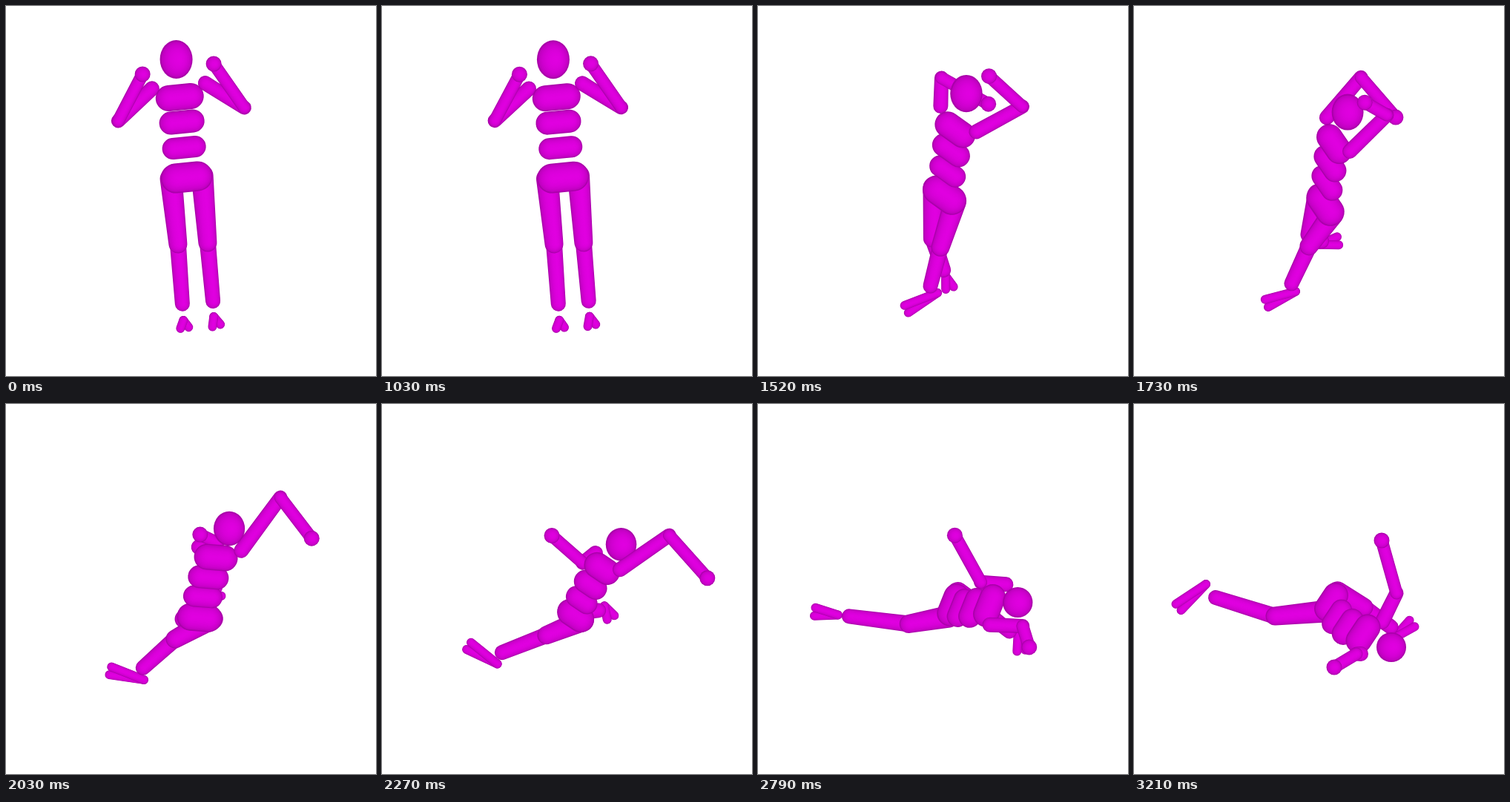
Recreate the animation shown at these times as an HTML page with a canvas. Size 499 by 499 pixels, loop 4030 ms.

```html
<!DOCTYPE html>
<html lang="en">
<head>
<meta charset="utf-8">
<title>Falling figure</title>
<style>
  html, body { margin: 0; width: 100%; height: 100%; overflow: hidden; background: #fff; }
  canvas { display: block; width: 100vw; height: 100vh; }
</style>
</head>
<body>
<canvas id="stage" width="499" height="499"></canvas>
<script>
const ctx = document.getElementById('stage').getContext('2d');
const LOOP = 4030;
const TIMES = [1010, 1300, 1730, 2030, 2520, 3200];
const LAYERS = 12;

const mix = (a, b, u) => a + (b - a) * u;
const between = (p, q, u) => p.map((v, k) => mix(v, q[k], u));
const add = (p, q, scale = 1) => p.map((v, k) => v + q[k] * scale);

// A smooth path through one point per key time, at rest at both ends.
function track(...points) {
  const last = points.length - 1;
  const slope = (i, k) => (points[i + 1][k] - points[i][k]) / (TIMES[i + 1] - TIMES[i]);
  const speed = (i, k) => i === 0 || i === last ? 0 : mix(slope(i - 1, k), slope(i, k),
    (TIMES[i] - TIMES[i - 1]) / (TIMES[i + 1] - TIMES[i - 1]));
  return time => {
    const t = Math.min(Math.max(time, TIMES[0]), TIMES[last]);
    const i = Math.min(TIMES.findLastIndex(key => key <= t), last - 1);
    const h = TIMES[i + 1] - TIMES[i], u = (t - TIMES[i]) / h;
    return [0, 1].map(k => mix(points[i][k], points[i + 1][k], u * u * (3 - 2 * u)) +
      h * u * (1 - u) * (speed(i, k) * (1 - u) - speed(i + 1, k) * u));
  };
}

// Only the joints that steer the pose; the rest of the body follows from them.
const head = track([230.5, 72], [268, 92.5], [288, 143], [301, 168], [344, 216], [347, 328]);
const chest = track([235, 123], [259, 146], [270, 186], [283, 207], [309, 239], [309, 310]);
const pelvis = track([244, 231], [245, 243], [258, 268], [261, 288], [261, 276], [266, 267]);
const across = track([30, -3], [30, 4], [13, 19], [24, 2], [-2, 22], [-12, 18]);

const left = {
  side: -1,
  elbow: track([152, 155], [175, 125], [306, 96], [285, 187], [267, 223], [354, 255]),
  hand: track([185, 92], [234, 114], [353, 150], [262, 176], [225, 173], [334, 184]),
  knee: track([232, 321], [234, 316], [237, 308], [240, 290], [282, 276], [310, 274]),
  heel: track([239, 424], [256, 402], [250, 322], [265, 265], [337, 298], [350, 316]),
  toe: track([240.5, 434], [243, 434], [275, 317], [288, 254], [332, 341], [375, 296])
};
const right = {
  side: 1,
  elbow: track([322, 137], [369, 122], [341, 147], [370, 126], [392, 249], [300, 337]),
  hand: track([281, 78], [325, 70], [311, 130], [412, 181], [429, 288], [270, 355]),
  knee: track([272, 319], [258, 324], [236, 324], [228, 317], [215, 306], [190, 286]),
  heel: track([280, 419], [264, 392], [218, 385], [186, 372], [127, 323], [97, 243]),
  toe: track([283.5, 431], [227, 412], [179, 401], [141, 360], [97, 297], [60, 274])
};

// Fills nested layers from the darker rim to the lit middle.
function shade(radius, tracePath) {
  for (let i = 0; i < LAYERS; i++) {
    const q = 1 - i / LAYERS;
    const light = Math.round(170 + 54 * Math.sqrt(1 - q * q));
    ctx.fillStyle = `rgb(${light},0,${light})`;
    ctx.beginPath();
    tracePath(q, radius * 0.2 * (1 - q));
    ctx.fill();
  }
}

function limb([x1, y1], [x2, y2], r1, r2 = r1) {
  const a = Math.atan2(y2 - y1, x2 - x1), quarter = Math.PI / 2;
  shade(r1, (q, shift) => {
    ctx.arc(x1 + shift, y1, r1 * q, a + quarter, a + 3 * quarter);
    ctx.arc(x2 + shift, y2, r2 * q, a - quarter, a + quarter);
  });
}

function ball([x, y], rx, ry = rx) {
  shade(rx, (q, shift) => ctx.ellipse(x + shift, y, rx * q, ry * q, 0, 0, 2 * Math.PI));
}

function drawArm({ side, elbow, hand }, t) {
  const neck = add(head(t), chest(t), -1);
  const shoulder = add(add(chest(t), across(t), 1.2 * side), neck, 0.3);
  limb(shoulder, elbow(t), 10, 9.5);
  limb(elbow(t), hand(t), 8.5);
  ball(hand(t), 10.5);
}

function drawLeg({ side, knee, heel, toe }, t) {
  const hip = add(pelvis(t), across(t), 0.7 * side);
  const foot = add(toe(t), heel(t), -1);
  const ankle = add(between(knee(t), heel(t), 0.76), foot, 0.25);
  const spread = 5.5 / Math.hypot(...foot);
  for (const s of [-spread, spread]) {
    limb(heel(t), add(toe(t), [-foot[1], foot[0]], s), 6);
  }
  limb(knee(t), ankle, 11, 10);
  limb(hip, knee(t), 15, 12.5);
}

function drawTorso(t, fall) {
  const sag = 9 * fall;
  for (const [down, radius] of [[1, 20 - 3 * fall], [0.63, 14.5], [0.31, 15.5], [0, 17.5]]) {
    const bend = Math.sin(Math.PI * down) * sag;
    const middle = add(between(chest(t), pelvis(t), down), [-bend, bend / 2]);
    limb(add(middle, across(t), -0.5), add(middle, across(t), 0.5), radius);
  }
}

function draw(t) {
  ctx.setTransform(1, 0, 0, 1, 0, 0);
  ctx.clearRect(0, 0, 499, 499);

  // A slight lean that settles at the start.
  const lean = Math.max(0, 1 - t / 120) / 300;
  ctx.setTransform(1, 0, lean, 1, -350 * lean, 0);

  const u = Math.min(Math.max((t - TIMES[0]) / 2190, 0), 1);
  const fall = u * u * (3 - 2 * u);

  drawLeg(left, t);
  drawArm(left, t);
  drawLeg(right, t);
  drawTorso(t, fall);
  ball(head(t), 22 - 2 * fall, 26 - 6 * fall);
  drawArm(right, t);
}

function tick() {
  draw(performance.now() % LOOP);
  requestAnimationFrame(tick);
}
tick();
</script>
</body>
</html>
```
